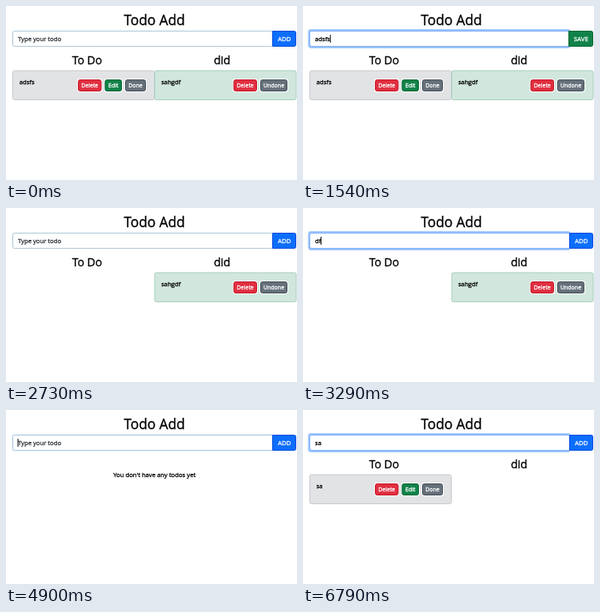
Recreate the animation shown at these times as an HTML page. Size 364 by 218 pixels, loop 6860 ms.

```html
<!DOCTYPE html>
<html lang="en">
<head>
<meta charset="utf-8">
<title>Todo Add</title>
<style>
html, body { margin: 0; width: 100%; height: 100%; overflow: hidden; background: #fff; }
svg { display: block; width: 364px; height: 218px; font: 7.7px "Open Sans", "Noto Sans", sans-serif; white-space: pre; }
text { stroke-width: .3px; }
</style>
</head>
<body>
<svg id="stage" viewBox="0 0 364 218"></svg>
<script>
const LOOP = 6860, FADE = 70, BLINK = 250;
const INK = '#000';
// fill and edge of each button
const RED = ['#e02f40', '#c41425'], GREEN = ['#108249', '#00642f'];
const GRAY = ['#66707a', '#434d57'], BLUE = ['#0d6efd', '#0048dc'];
const stage = document.getElementById('stage');

// start time, input text, focused, to-do item, done item, saving
const steps = [
  [0, '', 0, 'adsfs', 'sahgdf'],
  [1050, 'adsfs', 0, 'adsfs', 'sahgdf', 1],
  [1470, 'adsfs', 1, 'adsfs', 'sahgdf', 1],
  [2030, '', 0, 'adsfs', 'sahgdf'],
  [2450, '', 0, '', 'sahgdf'],
  [2940, '', 1, '', 'sahgdf'],
  [3150, 'd', 1, '', 'sahgdf'],
  [3220, 'df', 1, '', 'sahgdf'],
  [3360, 'dfv', 1, '', 'sahgdf'],
  [3430, 'dfvg', 1, '', 'sahgdf'],
  [3640, '', 1, 'dfvg', 'sahgdf'],
  [4340, '', 0, '', 'sahgdf'],
  [4620, '', 0, '', ''],
  [4895, '', 1, '', ''],
  [5250, 's', 1, '', ''],
  [5390, 'sa', 1, '', ''],
  [5740, '', 1, 'sa', ''],
  [6400, 's', 1, 'sa', ''],
  [6510, 'sa', 1, 'sa', '']
];

const measure = document.createElement('canvas').getContext('2d');
measure.font = '7.7px "Open Sans", "Noto Sans", sans-serif';

const rect = (x, y, w, h, fill, rest = '') =>
  `<rect x="${x}" y="${y}" width="${w}" height="${h}" rx="2.2" fill="${fill}" ${rest}/>`;

const text = (x, y, s, fill = INK, rest = '') =>
  `<text x="${x}" y="${y}" fill="${fill}" stroke="${fill}" ${rest}>${s}</text>`;

const centered = (x, y, s, size, fill = INK, weight = 400) =>
  text(x, y, s, fill, `text-anchor="middle" font-size="${size}" font-weight="${weight}"`);

const heading = (x, y, s, size) => centered(x, y, s, size, INK, 500);

// a pale halo surrounds each button
const button = (x, w, label, [fill, edge]) =>
  rect(x - .5, 91.5, w + 1, 16, '#fff', 'stroke="#fff" stroke-opacity=".7"')
  + rect(x + .5, 92.5, w - 1, 14, fill, `stroke="${edge}"`)
  + centered(x + w / 2, 102.4, label, 7, '#fff');

const card = (x, label, fill, border, buttons) =>
  rect(x + .5, 81, 177, 36.5, fill, `stroke="${border}"`) + text(x + 8.7, 98.3, label) + buttons;

function inputBox(value, glow, caret) {
  let out = rect(7.5, 30.2, 326, 21.6, 'none', `stroke="#0d6efd" stroke-width="2.4" stroke-opacity="${glow * .4}"`);
  out += rect(8.5, 31.4, 326, 19.2, '#fff', 'stroke="#aac4d6"');
  out += rect(8.5, 31.4, 326, 19.2, 'none', `stroke="#78affe" stroke-opacity="${glow}"`);
  out += value ? text(15, 43.8, value) : text(15, 43.8, 'Type your todo', '#2c3238');
  if (caret) {
    const x = value ? 15.3 + measure.measureText(value).width : 15;
    out += `<path d="M${x} 36v10" stroke="${INK}"/>`;
  }
  return out;
}

function submitButton(saving) {
  const x = saving ? 332.5 : 333.5;
  const [fill, edge] = saving ? GREEN : BLUE;
  return `<path d="M${x} 31.5H360.5a2 2 0 0 1 2 2V48.5a2 2 0 0 1-2 2H${x}z" fill="${fill}" stroke="${edge}"/>`
    + centered((x + 363) / 2, 43.8, saving ? 'SAVE' : 'ADD', 7.9, '#fff');
}

function draw(time) {
  const i = steps.findLastIndex(step => step[0] <= time);
  const [start, value, focused, todo, done, saving] = steps[i];
  const before = i ? steps[i - 1][2] : focused;
  const age = time - start;
  const glow = before + (focused - before) * Math.min(1, age / FADE);
  const caret = focused && Math.floor(age / BLINK) % 2 === 0;

  let out = heading(185.7, 23.5, 'Todo Add', 17.3)
    + inputBox(value, glow, caret) + submitButton(saving);
  if (todo || done) {
    out += heading(101.5, 73.3, 'To Do', 14) + heading(270.3, 73.3, 'did', 14);
  } else {
    out += centered(185.7, 84, "You don't have any todos yet", 7.7);
  }
  if (todo) {
    out += card(8, todo, '#e2e3e5', '#c6cacd',
      button(90, 29.5, 'Delete', RED) + button(123.5, 21.5, 'Edit', GREEN) + button(149, 26, 'Done', GRAY));
  }
  if (done) {
    out += card(185.5, done, '#d1e7dd', '#a5cfbb',
      button(284.5, 29.5, 'Delete', RED) + button(318, 34, 'Undone', GRAY));
  }
  return out;
}

let shown = '';
const origin = performance.now();
function tick() {
  const next = draw((performance.now() - origin) % LOOP);
  if (next !== shown) stage.innerHTML = shown = next;
  requestAnimationFrame(tick);
}
tick();
</script>
</body>
</html>
```
